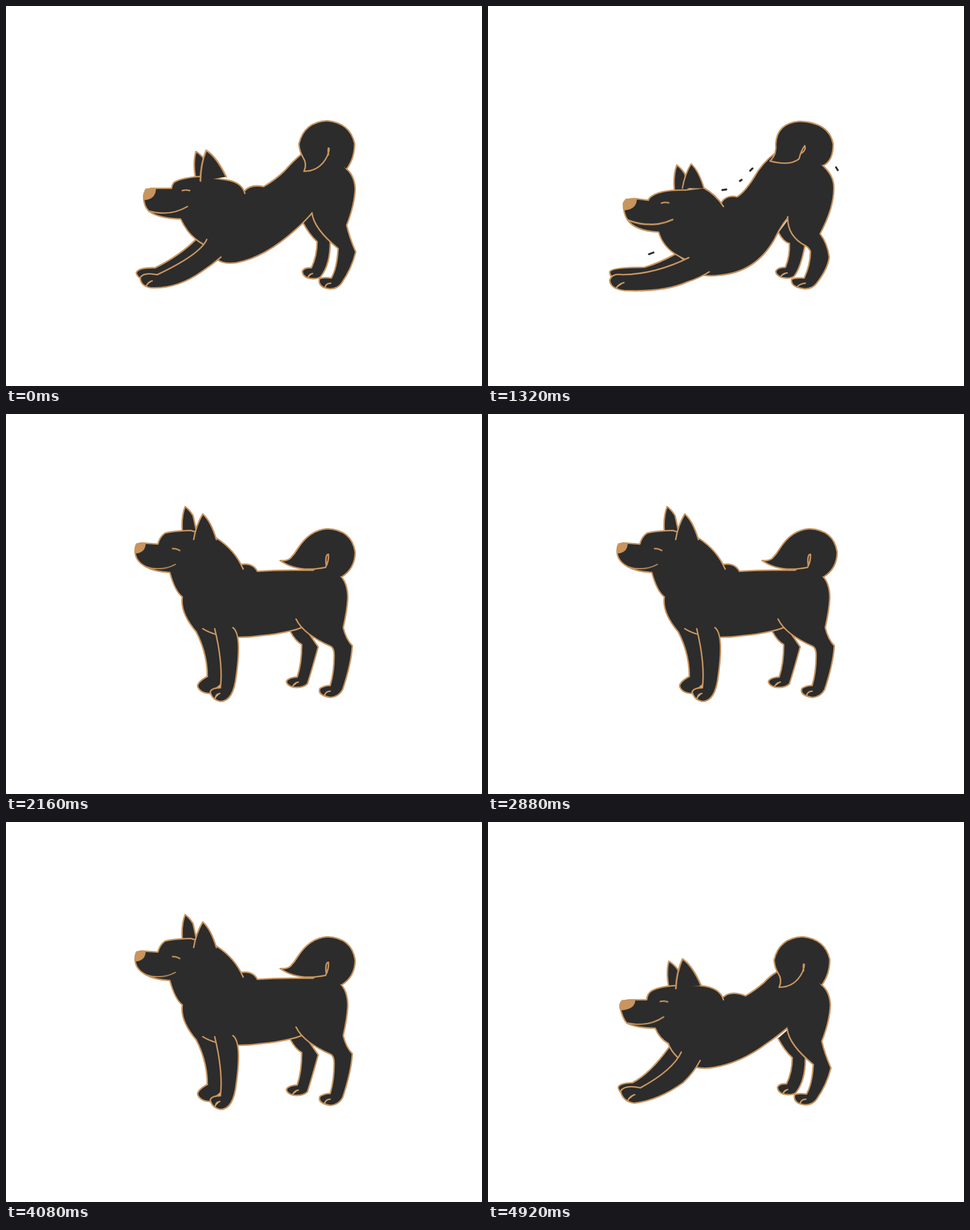
Animation of 837 by 669 pixels, one loop 5040 ms. Source, as an HTML page without scripts:

```html
<!DOCTYPE html>
<html lang="en">
<head>
<meta charset="utf-8">
<title>Stretching dog</title>
<style>
html, body { margin: 0; width: 100%; height: 100%; overflow: hidden; background: #fff; }
svg { display: block; width: 100%; height: 100%; }
path { fill: #2c2c2c; stroke: #c8955f; stroke-width: 2.6; stroke-linecap: round; stroke-linejoin: round; }
path, .hind { animation: 5.04s steps(3) infinite; }
.line { fill: none; }
.hind { animation-name: hind; }
#far-hind { animation-name: far-hind; }
#near-hind { animation-name: near-hind; }
#tail { animation-name: tail; }
#far-front { animation-name: far-front; }
#near-front { animation-name: near-front; }
#torso { animation-name: torso; }
#head { animation-name: head; }
#far-ear { animation-name: far-ear; }
#near-ear { animation-name: near-ear; }
#nose { fill: #c8955f; stroke-width: 1.5; animation-name: nose; }
#mouth { animation-name: mouth; }
#eye { animation-name: eye; }
#dashes { fill: none; stroke: #2c2c2c; stroke-width: 3.4; animation: dashes .24s steps(1) infinite, show 5.04s steps(1) infinite; }

/* Poses: bow 0%, deep stretch 7-28%, stand 35-83%, step 90%, lean down 97% */

/* The hindquarters have three shapes; step and lean only shift them */
@keyframes hind {
  0%, 83.333% { transform: translate(0); }
  90.476% { transform: translate(15px); }
  97.619%, 100% { transform: translate(-12px); }
}
@keyframes far-hind {
  0%, 97.619%, 100% { d: path("M522 381Q533 402 547 415Q547 440 537 461Q524 460 521 467Q521 475 531 479Q545 482 553 477Q571 455 570 412L540 365M531 478Q533 472 539 471"); }
  7.142%, 28.571% { d: path("M511 399Q519 415 530 418Q531 440 523 460Q509 460 506 467Q506 474 517 478Q530 481 538 476Q550 462 558 418L532 370M515 476Q519 470 526 470"); }
  35.714%, 90.476% { d: path("M500 383Q509 400 520 406Q520 440 512 463Q496 464 493 471Q494 478 505 481Q522 483 530 475Q538 450 549 410L520 368M504 480Q507 473 514 472"); }
}
@keyframes near-hind {
  0%, 97.619%, 100% { d: path("M555 235L599 287Q613 299 614 322Q613 350 599 386Q604 408 615 433Q608 462 590 488Q583 498 570 498Q548 496 551 480Q558 477 572 479Q582 462 584 427Q541 392 538 364M561 495Q563 488 571 488"); }
  7.142%, 28.571% { d: path("M545 235L589 281Q607 298 608 316Q610 352 584 401Q597 418 600 442Q598 462 578 488Q571 498 557 498Q531 495 534 481Q541 478 556 479Q567 455 567 432Q563 424 558 422Q526 405 527 371M543 495Q548 489 558 488"); }
  35.714%, 90.476% { d: path("M560 235L590 287Q601 300 601 324Q600 345 593 376Q598 397 609 408Q607 440 592 485Q585 498 570 499Q547 495 552 483Q560 478 570 478Q577 455 577 425Q577 412 571 409Q523 388 510 361M560 496Q562 488 570 488"); }
}
@keyframes tail {
  0%, 97.619%, 100% { d: path("M599 287Q613 268 613 242Q605 206 565 202Q524 204 515 243Q516 256 522 266Q530 278 524 291Q552 291 565 264Q570 250 567 250Q566 252 567 262"); }
  7.142%, 28.571% { d: path("M589 281Q607 273 607 243Q600 205 548 203Q508 206 506 243Q507 250 505 258Q503 266 496 273Q532 282 547 269Q551 253 557 246Q560 254 550 260"); }
  35.714%, 83.333% { d: path("M590 287Q614 272 614 243Q608 204 565 202Q534 204 513 237Q507 247 500 254Q494 259 482 258Q513 280 562 270Q568 258 567 247Q561 247 563 266"); }
  90.476% { d: path("M590 288Q613 274 613 243Q607 204 569 201Q519 206 513 243Q515 258 518 268Q527 281 547 301Q562 288 562 262Q562 246 566 247Q569 254 564 261"); }
}

@keyframes far-front {
  0% { d: path("M335 410Q305 440 262 461Q232 460 229 470Q231 477 238 480L300 475L355 425"); }
  7.142%, 28.571% { d: path("M329 437Q300 453 275 460Q217 460 214 468Q214 472 216 475L300 480L355 455"); }
  35.714%, 83.333% { d: path("M328 372Q354 415 354 462Q336 472 337 480Q342 492 359 492L385 470L385 370"); }
  90.476% { d: path("M339 381Q320 430 290 461Q258 462 257 471Q259 481 270 485L310 470L365 395"); }
  97.619%, 100% { d: path("M318 397Q285 443 254 459Q229 460 229 468Q231 475 236 477L280 478L345 420"); }
}
@keyframes near-front {
  0% { d: path("M353 411Q342 437 266 473Q240 468 236 479Q237 493 254 496Q300 499 345 467Q362 456 378 442M247 492Q250 486 257 484"); }
  7.142%, 28.571% { d: path("M353 443Q295 472 237 473Q217 470 214 483Q215 498 240 501Q310 504 350 486Q372 479 389 468M226 496Q230 489 239 487"); }
  35.714%, 83.333% { d: path("M367 378Q382 440 377 482Q362 482 359 489Q362 503 377 506Q400 506 405 460Q415 388 399 376M368 500Q369 493 376 492"); }
  90.476% { d: path("M359 382Q345 418 291 469Q270 467 268 476Q270 490 294 492Q330 472 392 402Q393 390 392 376M281 490Q283 483 290 480"); }
  97.619%, 100% { d: path("M340 405Q325 437 268 468Q240 462 233 474Q237 492 257 495Q300 490 343 459Q362 441 373 420M246 490Q249 483 258 480"); }
}

/* Shoulder bump, back, then belly and chest */
@keyframes torso {
  0% { d: path("M345 385L419 326Q430 313 453 318Q475 305 490 290Q505 273 518 262L575 235L542 360Q526 379 510 393Q455 443 405 452Q384 455 372 447Q361 432 346 418"); }
  7.142%, 28.571% { d: path("M345 415L411 345Q420 332 438 336Q451 328 467 303Q482 276 505 259L565 235L538 361Q518 380 503 412Q470 469 407 474Q392 476 378 474Q360 462 345 444"); }
  35.714%, 83.333% { d: path("M325 368L412 265Q434 261 442 277Q470 275 500 275Q520 275 540 275L580 245L520 376Q510 380 500 382Q475 388 450 390Q430 393 410 393Q370 393 346 378"); }
  90.476% { d: path("M335 340L429 282Q440 267 465 275Q480 278 495 273Q514 270 534 269L595 245L535 376Q519 380 505 382Q470 387 435 390Q412 392 393 394Q372 400 355 390"); }
  97.619%, 100% { d: path("M335 375L414 308Q427 296 453 306Q470 296 485 283Q497 270 508 264L563 235L528 361Q508 378 490 390Q445 424 397 432Q380 435 366 432Q350 425 333 414"); }
}
@keyframes head {
  0% { d: path("M420 330Q415 310 387 306L343 300Q310 302 296 310Q292 314 291 321L255 321Q242 324 242 336Q242 352 251 361Q268 374 307 375Q318 398 333 410Q340 416 348 420"); }
  7.142%, 28.571% { d: path("M414 353Q401 332 379 320L348 324Q300 323 285 337Q282 340 282 342L258 339Q240 339 238 348Q238 365 245 376Q258 396 300 398Q307 422 328 436Q338 442 348 447"); }
  35.714%, 83.333% { d: path("M417 273Q403 240 371 219L325 205Q290 206 279 210Q270 217 267 229L238 227Q228 228 227 240Q226 258 246 269Q262 278 288 279Q297 312 310 322Q306 350 334 383"); }
  90.476% { d: path("M429 282Q397 244 352 233L308 236Q278 249 268 262Q265 268 267 282L243 293Q228 298 228 305Q236 320 248 328Q265 333 302 322Q312 344 327 354Q333 376 355 390"); }
  97.619%, 100% { d: path("M414 313Q408 291 373 288L332 288Q303 289 288 297Q280 302 279 313L250 313Q232 314 232 325Q236 345 244 354Q262 363 294 363Q302 382 317 390Q321 402 333 414"); }
}

/* Rigid parts of the face */
@keyframes far-ear {
  0% { transform: translate(334px, 256px) rotate(-5deg); }
  7.142%, 28.571% { transform: translate(332px, 280px) rotate(-1deg); }
  35.714%, 83.333% { transform: translate(315px, 163px) rotate(0deg); }
  90.476% { transform: translate(287px, 205px) rotate(-24deg); }
  97.619%, 100% { transform: translate(318px, 245px) rotate(-6deg); }
}
@keyframes near-ear {
  0% { transform: translate(352px, 254px) rotate(-9deg) scale(1.15); }
  7.142%, 28.571% { transform: translate(357px, 278px) rotate(0deg) scale(.95); }
  35.714%, 83.333% { transform: translate(346px, 176px) rotate(0deg) scale(1); }
  90.476% { transform: translate(310px, 195px) rotate(-20deg) scale(1.05); }
  97.619%, 100% { transform: translate(342px, 241px) rotate(-7deg) scale(1.12); }
}
@keyframes nose {
  0% { transform: translate(243px, 321px) rotate(0deg) scale(1); }
  7.142%, 28.571% { transform: translate(239px, 339px) rotate(0deg) scale(1.1, 1); }
  35.714%, 83.333% { transform: translate(227px, 227px) rotate(0deg) scale(.9); }
  90.476% { transform: translate(229px, 301px) rotate(-28deg) scale(.9); }
  97.619%, 100% { transform: translate(232px, 313px) rotate(0deg) scale(1.3, .9); }
}
@keyframes mouth {
  0% { transform: translate(251px, 361px) rotate(0deg) scale(1); }
  7.142%, 28.571% { transform: translate(246px, 377px) rotate(6deg) scale(1.15); }
  35.714%, 83.333% { transform: translate(246px, 269px) rotate(2deg) scale(.76); }
  90.476% { transform: translate(250px, 328px) rotate(-20deg) scale(.82); }
  97.619%, 100% { transform: translate(246px, 354px) rotate(-3deg) scale(.93); }
}
@keyframes eye {
  0% { transform: translate(310px, 325px) rotate(0deg); }
  7.142%, 28.571% { transform: translate(305px, 347px) rotate(-2deg); }
  35.714%, 83.333% { transform: translate(293px, 237px) rotate(15deg); }
  90.476% { transform: translate(288px, 279px) rotate(-25deg); }
  97.619%, 100% { transform: translate(303px, 316px) rotate(3deg); }
}

@keyframes dashes {
  0% { d: path("M416 324L424 323M444 307L450 303M463 290L467 284M612 288L615 294M285 436L295 436"); }
  50%, 100% { d: path("M412 324L419 323M443 308L446 306M461 290L465 286M612 284L615 289M283 437L291 434"); }
}
@keyframes show {
  0%, 28.571%, 100% { visibility: hidden; }
  7.142% { visibility: visible; }
}
</style>
</head>
<body>
<svg viewBox="0 0 837 669">
  <g class="hind"><path id="far-hind"/></g>
  <path id="far-front"/>
  <path id="far-ear" d="M-5 44Q-7 18 0 0Q8 6 14 16L20 44"/>
  <path id="torso"/>
  <g class="hind"><path id="near-hind"/></g>
  <path id="head"/>
  <path id="near-front"/>
  <path id="near-ear" d="M-16 45Q-12 20 0 0Q14 12 24 45"/>
  <g class="hind"><path id="tail"/></g>
  <path id="nose" d="M3 1L20 0Q20 18 1 20Q-2 8 3 1Z"/>
  <path id="mouth" class="line" d="M0 0Q38 10 68 -8"/>
  <path id="eye" class="line" d="M0 0Q6 -2 13 0"/>
  <path id="dashes"/>
</svg>
</body>
</html>
```
